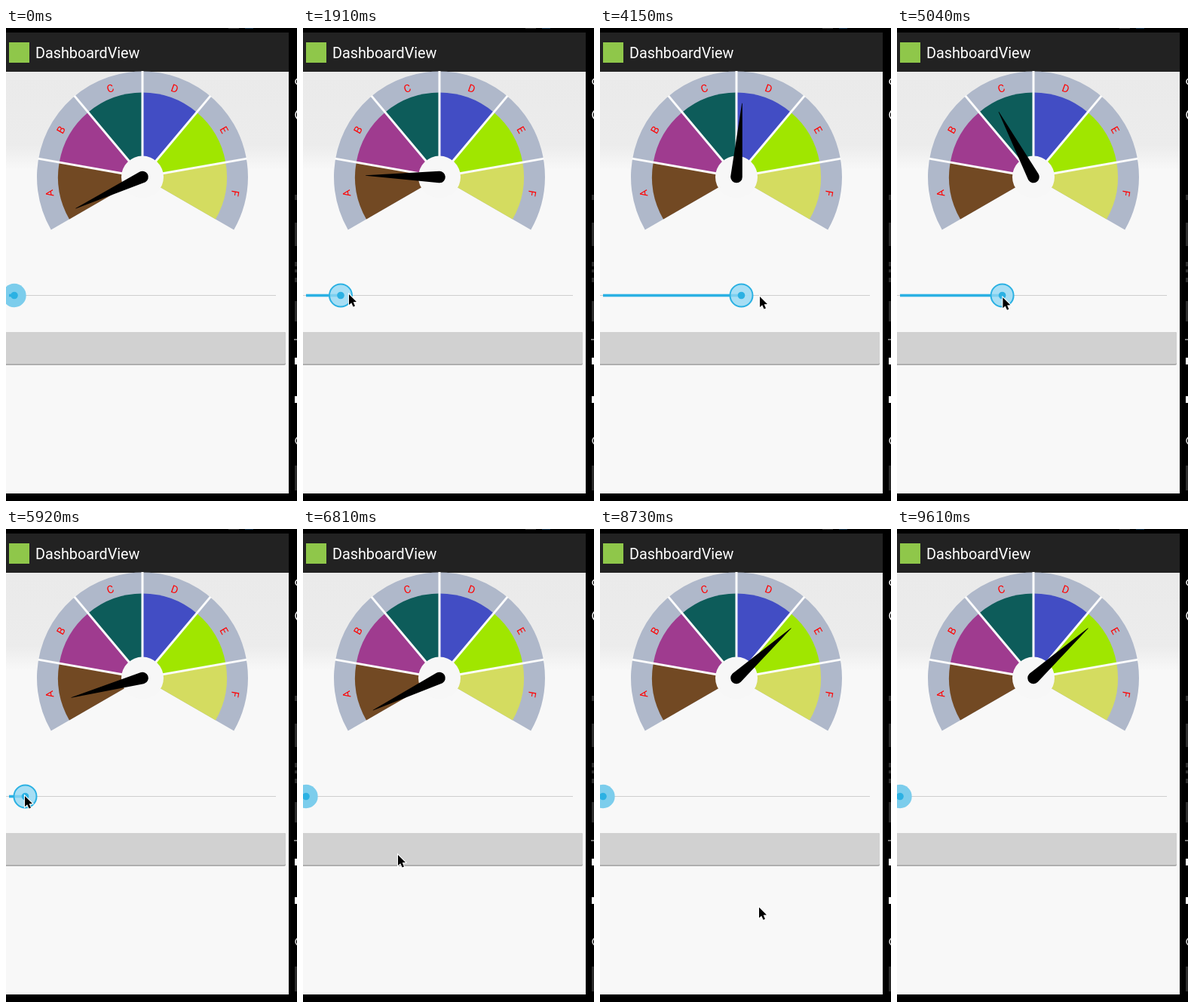
These frames come from a looping animation (386 by 627 pixels, 9.96 s). An HTML page with a canvas:

```html
<!DOCTYPE html>
<html lang="en">
<head>
<meta charset="utf-8">
<title>DashboardView</title>
<style>
html, body { margin: 0; width: 100%; height: 100%; overflow: hidden; background: #000; }
canvas { display: block; }
</style>
</head>
<body>
<canvas id="stage" width="386" height="627"></canvas>
<script>
const ctx = document.getElementById('stage').getContext('2d');
const LOOP = 9960, STEP = 148, FIRST = 130;
const CX = 181, CY = 197.5, TRACK_Y = 354.5, TRACK_X = 4, TRACK_W = 354;
const BLUE = '#2bb1e3', PAPER = '#f8f8f8';
const SECTORS = ['#724923', '#9f3b8f', '#0d5c5a', '#424dc4', '#a0e600', '#d4dc60'];

// Keys are [step, value...]; the picture advances once per step.
const THUMB = [[0, 11], [9, 11], [11, 50], [13, 50], [20, 205], [21, 212.5], [26, 35], [27, 43],
  [28, 187.5], [30, 302], [35, 99], [40, 25.5], [42, 4]];
const POINTER = [[1, 321, 588], [5, 150, 487], [8, 8, 355], [9, 10, 355], [11, 60, 353], [13, 60, 352],
  [20, 208, 352], [21, 214, 351], [26, 36, 356], [27, 60, 357], [28, 211, 355], [30, 305, 357],
  [35, 98, 356], [40, 24, 353], [42, 4, 358], [43, 60, 391], [44, 125, 431], [55, 125, 431],
  [63, 295, 570], [64, 372, 609]];

const rad = deg => deg * Math.PI / 180;

function sample(keys, step, column = 1) {
  const next = keys.findIndex(key => key[0] > step);
  if (next < 0) return keys[keys.length - 1][column];
  if (next === 0) return keys[0][column];
  const a = keys[next - 1], b = keys[next];
  return a[column] + (b[column] - a[column]) * (step - a[0]) / (b[0] - a[0]);
}

function rect(x, y, w, h, color) {
  ctx.fillStyle = color;
  ctx.fillRect(x, y, w, h);
}

function disc(x, y, r, color) {
  ctx.fillStyle = color;
  ctx.beginPath();
  ctx.arc(x, y, r, 0, 7);
  ctx.fill();
}

function ring(x, y, r, width, color) {
  ctx.strokeStyle = color;
  ctx.lineWidth = width;
  ctx.beginPath();
  ctx.arc(x, y, r, 0, 7);
  ctx.stroke();
}

function wedge(r, from, to, color) {
  ctx.fillStyle = color;
  ctx.beginPath();
  ctx.moveTo(CX, CY);
  ctx.arc(CX, CY, r, rad(from), rad(to));
  ctx.fill();
}

function drawScreen() {
  rect(0, 0, 386, 627, '#000');
  const sky = ctx.createLinearGradient(0, 58, 0, 188);
  sky.addColorStop(0, '#eaeaea');
  sky.addColorStop(0.75, '#ececec');
  sky.addColorStop(1, PAPER);
  rect(0, 58, 375, 559, sky);
  rect(0, 6, 375, 52, '#222');
  rect(4, 19, 27, 27, '#8fc74a');
  ctx.fillStyle = '#fff';
  ctx.font = '19.8px Roboto, sans-serif';
  ctx.textAlign = 'left';
  ctx.textBaseline = 'alphabetic';
  ctx.fillText('DashboardView', 39, 39.5);

  // Slivers of the window behind the phone.
  rect(295, 0, 14, 1, '#333');
  rect(317, 0, 11, 1, '#12304a');
  for (const [y, h] of [[221, 7], [258, 31], [310, 6], [320, 4], [331, 6], [362, 27], [580, 33]])
    rect(383, y, 3, h, '#2c2c2c');
  for (const [y, h] of [[437, 9], [488, 9]]) rect(383, y, 3, h, '#fff');
  ring(388, 71, 4, 1.5, '#fff');
  ring(391, 115, 7, 1.5, '#fff');
  ring(389, 547, 5, 1.5, '#ddd');
  rect(382, 412, 4, 2, '#777');
}

function drawDial(angle) {
  wedge(140, 150, 390, '#afb8ca');
  SECTORS.forEach((color, i) => wedge(112, 150 + i * 40, 190 + i * 40, color));
  ctx.font = '14px Roboto, sans-serif';
  ctx.textAlign = 'center';
  SECTORS.forEach((_, i) => {
    ctx.save();
    ctx.translate(CX, CY);
    ctx.rotate(rad(260 + i * 40));
    ctx.fillStyle = '#f00';
    ctx.fillText('ABCDEF'[i], 0, -120);
    if (i) rect(-1.5, -140, 3, 140, PAPER), ctx.rotate(0);
    ctx.restore();
  });
}

function drawDividers() {
  for (let i = 1; i < SECTORS.length; i++) {
    ctx.save();
    ctx.translate(CX, CY);
    ctx.rotate(rad(150 + i * 40));
    rect(0, -1.5, 140.5, 3, '#fcfcfc');
    ctx.restore();
  }
  disc(CX, CY, 28, '#f7f7f7');
}

function drawLetters() {
  ctx.font = '14px Roboto, sans-serif';
  ctx.textAlign = 'center';
  ctx.fillStyle = '#f00';
  SECTORS.forEach((_, i) => {
    ctx.save();
    ctx.translate(CX, CY);
    ctx.rotate(rad(260 + i * 40));
    ctx.fillText('ABCDEF'[i], 0, -120);
    ctx.restore();
  });
}

function drawGauge() {
  wedge(140, 150, 390, '#afb8ca');
  SECTORS.forEach((color, i) => wedge(112, 150 + i * 40, 190 + i * 40, color));
  drawDividers();
  drawLetters();
}

function drawNeedle(angle) {
  ctx.save();
  ctx.translate(CX, CY);
  ctx.rotate(rad(angle));
  ctx.fillStyle = '#000';
  ctx.beginPath();
  ctx.arc(0, 0, 7.8, rad(85), rad(275));
  ctx.lineTo(98, -0.3);
  ctx.lineTo(98, 0.3);
  ctx.fill();
  ctx.restore();
}

function drawSlider(x, pressed) {
  rect(0, 354, 358, 1, '#cecece');
  rect(TRACK_X, TRACK_Y - 1.8, x - TRACK_X, 3.6, BLUE);
  if (pressed) {
    disc(x, TRACK_Y, 15.5, 'rgba(160,219,243,.93)');
    ring(x, TRACK_Y, 15, 2, BLUE);
    rect(Math.max(TRACK_X, x - 15), TRACK_Y - 1.8, Math.min(15, x - TRACK_X), 3.6, 'rgba(43,177,227,.25)');
  } else {
    disc(x, TRACK_Y, 15.7, '#7ccdec');
    rect(TRACK_X, TRACK_Y - 1.8, x - TRACK_X, 3.6, BLUE);
  }
  disc(x, TRACK_Y, 4.8, BLUE);
}

function drawButton() {
  ctx.fillStyle = '#a9a9a9';
  ctx.beginPath();
  ctx.roundRect(-5, 403, 376, 44, 2);
  ctx.fill();
  ctx.fillStyle = '#d1d1d1';
  ctx.beginPath();
  ctx.roundRect(-5, 403, 376, 42.3, 2);
  ctx.fill();
}

function drawPointer(x, y) {
  ctx.save();
  ctx.translate(x, y);
  ctx.beginPath();
  for (const [px, py] of [[1, 1], [1, 15], [4.2, 12.2], [6.6, 17.6], [9, 16.6], [6.7, 11.3], [11, 11]])
    ctx.lineTo(px, py);
  ctx.closePath();
  ctx.lineWidth = 2;
  ctx.strokeStyle = '#fff';
  ctx.stroke();
  ctx.fillStyle = '#000';
  ctx.fill();
  ctx.restore();
}

function needleAngle(step, thumb) {
  const spin = Math.min(1, Math.max(0, (step - 45.1) / 9));
  return 150 + (thumb - TRACK_X) / TRACK_W * 240 + 167.7 * (0.5 - 0.5 * Math.cos(Math.PI * spin));
}

function draw(now) {
  const step = Math.max(0, Math.min(65, Math.floor((now % LOOP - FIRST) / STEP) + 1));
  const thumb = sample(THUMB, step);
  drawScreen();
  drawGauge();
  drawNeedle(needleAngle(step, thumb));
  drawSlider(thumb, step >= 9 && step < 42);
  drawButton();
  if (step >= 1 && step <= 64) drawPointer(sample(POINTER, step), sample(POINTER, step, 2));
  requestAnimationFrame(draw);
}
draw(0);
</script>
</body>
</html>
```
